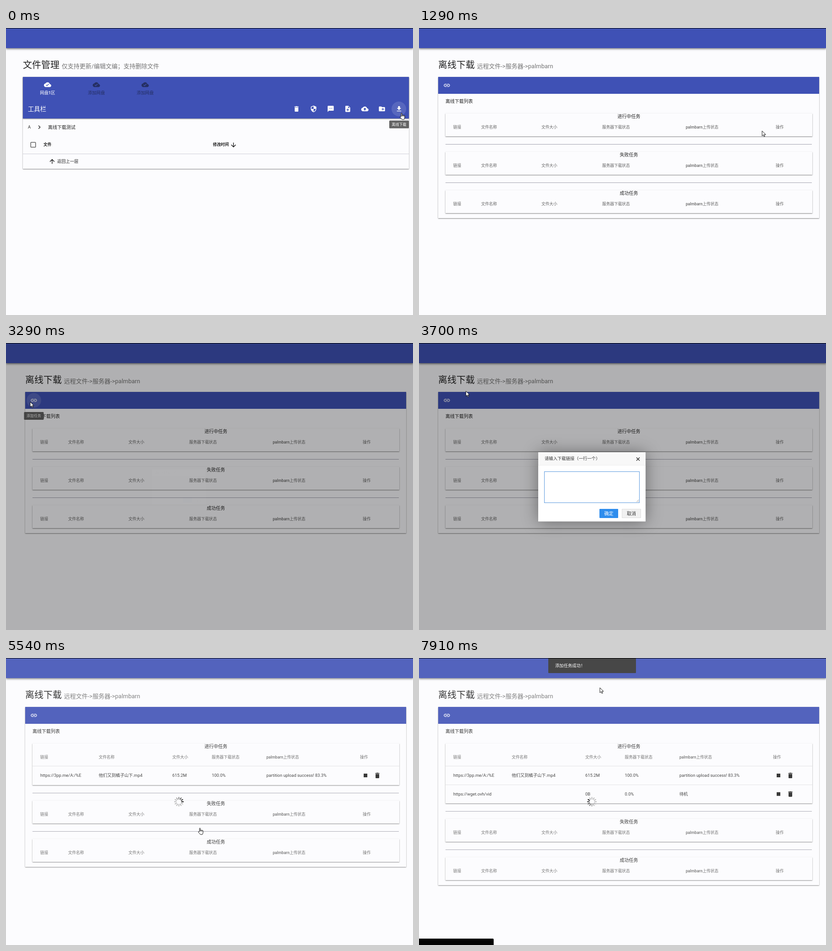
An HTML page with a canvas that plays this animation: 891x628 px, repeating every 8 s.

```html
<!DOCTYPE html>
<html lang="zh-CN">
<head>
<meta charset="utf-8">
<style>
html, body { margin: 0; width: 100%; height: 100%; overflow: hidden; background: #fcfcfe; }
canvas { display: block; }
</style>
</head>
<body>
<canvas id="stage" width="891" height="628"></canvas>
<script>
const W = 891, H = 628, LOOP = 8000;
const ctx = document.getElementById('stage').getContext('2d');
const BLUE = '#3f51b5', PAPER = '#fcfcfe', INK = '#222', GREY = '#757575';
const SANS = 'Roboto, "Noto Sans CJK SC", "Noto Sans CJK", sans-serif';
const MONO = '"Liberation Mono", monospace';
const SERVICE = 'palmbarn';

const CLOUD = 'M19.35 10.04C18.67 6.59 15.64 4 12 4 9.11 4 6.6 5.64 5.35 8.04 2.34 8.36 0 10.91 0 14c0 3.31 2.69 6 6 6h13c2.76 0 5-2.24 5-5 0-2.64-2.05-4.78-4.65-4.96z';
const paths = {
  trash: 'M6 19c0 1.1.9 2 2 2h8c1.1 0 2-.9 2-2V7H6v12zM19 4h-3.5l-1-1h-5l-1 1H5v2h14V4z',
  shield: 'M12 1L3 5v6c0 5.55 3.84 10.74 9 12 5.16-1.26 9-6.45 9-12V5l-9-4zm0 10.99h7c-.53 4.12-3.28 7.79-7 8.94V12H5V6.3l7-3.11v8.8z',
  message: 'M20 2H4c-1.1 0-1.99.9-1.99 2L2 22l4-4h14c1.1 0 2-.9 2-2V4c0-1.1-.9-2-2-2zM9 11H7V9h2v2zm4 0h-2V9h2v2zm4 0h-2V9h2v2z',
  addFile: 'M14 2H6c-1.1 0-1.99.9-1.99 2L4 20c0 1.1.89 2 1.99 2H18c1.1 0 2-.9 2-2V8l-6-6zm2 14h-3v3h-2v-3H8v-2h3v-3h2v3h3v2zm-3-7V3.5L18.5 9H13z',
  upload: CLOUD + 'M14 13v4h-4v-4H7l5-5 5 5h-3z',
  cloudDone: CLOUD + 'M10 17l-3.5-3.5 1.41-1.41L10 14.17 15.18 9l1.41 1.41L10 17z',
  addFolder: 'M20 6h-8l-2-2H4c-1.11 0-1.99.89-1.99 2L2 18c0 1.11.89 2 2 2h16c1.11 0 2-.89 2-2V8c0-1.11-.89-2-2-2zm-1 8h-3v3h-2v-3h-3v-2h3V9h2v3h3v2z',
  download: 'M19 9h-4V3H9v6H5l7 7 7-7zM5 18v2h14v-2H5z',
  link: 'M3.9 12c0-1.71 1.39-3.1 3.1-3.1h4V7H7c-2.76 0-5 2.24-5 5s2.24 5 5 5h4v-1.9H7c-1.71 0-3.1-1.39-3.1-3.1zM8 13h8v-2H8v2zm9-6h-4v1.9h4c1.71 0 3.1 1.39 3.1 3.1s-1.39 3.1-3.1 3.1h-4V17h4c2.76 0 5-2.24 5-5s-2.24-5-5-5z',
  stop: 'M6 6h12v12H6z',
  up: 'M4 12l1.41 1.41L11 7.83V20h2V7.83l5.58 5.59L20 12l-8-8-8 8z',
  down: 'M20 12l-1.41-1.41L13 16.17V4h-2v12.17l-5.58-5.59L4 12l8 8 8-8z',
  chevron: 'M10 6L8.59 7.41 13.17 12l-4.58 4.59L10 18l6-6z',
  arrow: 'M0 0V11l2.6-2.4 1.8 4 1.7-.8-1.8-3.8H8z',
  hand: 'M-1 8V.8q1-1.4 2 0V5q1-1 2 0 1-.8 2 .3 1-.6 1.8.5V10q0 2-1.5 4.2H1Q-1.2 11.5-3.4 9-3.4 7.3-1.8 7.6Z'
};
const shapes = Object.fromEntries(Object.entries(paths).map(([name, d]) => [name, new Path2D(d)]));

const clamp = x => Math.max(0, Math.min(1, x));
const progress = (t, start, length) => clamp((t - start) / length);
const easeOut = x => 1 - (1 - x) ** 3;

function rect(x, y, w, h, color) {
  ctx.fillStyle = color;
  ctx.fillRect(x, y, w, h);
}
function rounded(x, y, w, h, r, color) {
  ctx.fillStyle = color;
  ctx.beginPath();
  ctx.roundRect(x, y, w, h, r);
  ctx.fill();
}
function outline(x, y, w, h, color) {
  ctx.strokeStyle = color;
  ctx.lineWidth = 1;
  ctx.strokeRect(x + .5, y + .5, w - 1, h - 1);
}
function disc(x, y, r, color) {
  ctx.fillStyle = color;
  ctx.beginPath();
  ctx.arc(x, y, r, 0, 7);
  ctx.fill();
}
// y is the visual middle of the line
function text(s, x, y, size, color, weight = 400, align = 'left', family = SANS) {
  ctx.font = `${weight} ${size}px ${family}`;
  ctx.fillStyle = color;
  ctx.textAlign = align;
  ctx.fillText(s, x, y + size * .37);
}
function icon(name, x, y, color) {
  ctx.save();
  ctx.translate(x - 8, y - 8);
  ctx.scale(2 / 3, 2 / 3);
  ctx.fillStyle = color;
  ctx.fill(shapes[name], 'evenodd');
  ctx.restore();
}
function raised(x, y, w, h, color, blur = 2, alpha = .5, drop = 1) {
  ctx.save();
  ctx.shadowColor = `rgba(0,0,0,${alpha})`;
  ctx.shadowBlur = blur;
  ctx.shadowOffsetY = drop;
  rect(x, y, w, h, color);
  ctx.restore();
}
function scaled(cx, cy, scale, alpha, draw) {
  if (alpha <= 0) return;
  ctx.save();
  ctx.globalAlpha = alpha;
  ctx.translate(cx, cy);
  ctx.scale(scale, scale);
  ctx.translate(-cx, -cy);
  draw();
  ctx.restore();
}
function tooltip(label, x, y, shown) {
  scaled(x, y, shown, shown, () => {
    rounded(x - 21.5, y - 8.5, 43, 17, 1.5, 'rgba(90,90,90,.94)');
    text(label, x, y, 8, '#fff', 500, 'center');
  });
}

function pageTop(title, subtitle, x) {
  rect(0, 0, W, H, PAPER);
  raised(0, 0, W, 44, BLUE, 4, .5, 2);
  text(title, x, 81, 20, INK, 300);
  text(subtitle, x + 85, 83.5, 13, GREY);
}

function filesPage(t) {
  pageTop('文件管理', '仅支持更新/编辑文编；支持删除文件', 37);
  raised(37, 107, 845, 201, PAPER);
  raised(37, 107, 845, 91, BLUE);
  ['网盘1区', '添加网盘', '添加网盘'].forEach((label, i) => {
    const color = i ? '#252f63' : '#fff', x = 91 + i * 106.8;
    icon('cloudDone', x, 124, color);
    text(label, x, 142, 9.33, color, 500, 'center');
  });
  text('工具栏', 48, 177, 13.33, '#fff');
  disc(860, 177, 16, 'rgba(255,255,255,.13)');
  const ripple = progress(t, 80, 220);
  if (ripple) disc(860, 177, 16 * easeOut(ripple), 'rgba(255,255,255,.15)');
  ['trash', 'shield', 'message', 'addFile', 'upload', 'addFolder', 'download']
    .forEach((name, i) => icon(name, 636 + i * 37.4, 177, '#fff'));

  text('A', 48, 217, 9.33, INK);
  icon('chevron', 73, 217, INK);
  text('离线下载测试', 92, 217, 10, INK);
  rounded(53.5, 249.5, 12, 12, 1.5, '#606060');
  rect(55, 251, 9, 9, PAPER);
  text('文件', 82, 255, 8.67, INK, 700);
  text('修改时间', 453, 255, 8.67, INK, 700);
  icon('down', 498, 256, '#111');
  rect(37, 275, 845, 1, '#d0d0d8');
  icon('up', 101, 292, '#111');
  text('返回上一层', 112, 292, 9.33, INK);
  tooltip('离线下载', 860.5, 211, 1);
}

const headers = ['链接', '文件名称', '文件大小', '服务器下载状态', SERVICE + '上传状态', '操作'];
const emptyColumns = [75, 136, 268, 401, 584, 781];
const filledColumns = [75, 203, 364, 450.5, 570, 775];
const ROW = 122 / 3;
const tasks = [
  ['https://3pp.me/A:/%E', '他们又到橘子山下.mp4', '615.2M', '100.0%', 'partition upload success! 83.3%'],
  ['https://wget.ovh/vid', '', '0B', '0.0%', '待机']
];

function taskTable(title, top, rows) {
  const columns = rows.length ? filledColumns : emptyColumns;
  raised(58, top, 803, 50 + Math.round(ROW * rows.length), PAPER);
  text(title, 459.5, top + 6, 10, INK, 400, 'center');
  headers.forEach((label, i) => text(label, columns[i], top + 30, 8.67, '#666', 500));
  rows.forEach((row, r) => {
    const y = top + 70 + r * ROW;
    rect(58, top + 49 + Math.round(r * ROW), 803, 1, '#e0e0e2');
    row.forEach((cell, i) => text(cell, columns[i], y, 9.33, '#333'));
    icon('stop', 787, y, '#222');
    icon('trash', 813, y, '#222');
  });
}

function tasksPage(t) {
  const rows = tasks.slice(0, (t >= 5450) + (t >= 7600));
  const shift = Math.round(ROW * rows.length);
  pageTop('离线下载', `远程文件->服务器->${SERVICE}`, 42);
  raised(42, 107, 834, 309 + shift, PAPER);
  rect(42, 107, 834, 37, BLUE);
  const hover = progress(t, 2590, 220) * (1 - progress(t, 3420, 180));
  disc(61, 125.5, 16, `rgba(255,255,255,${.13 * hover})`);
  icon('link', 61, 125.5, '#fff');
  text('离线下载列表', 58, 160, 10, INK);
  taskTable('进行中任务', 187, rows);
  taskTable('失败任务', 271 + shift, []);
  taskTable('成功任务', 355 + shift, []);
  [254, 338].forEach(y => rect(58, y + shift, 802, 1, '#a2a2ae'));
  tooltip('添加任务', 61, 159.5, easeOut(hover));
}

function squiggle(from, to) {
  ctx.strokeStyle = '#e33';
  ctx.lineWidth = .7;
  ctx.beginPath();
  for (let x = from; x <= to; x++) ctx.lineTo(x, 292 + (x % 2 ? .6 : -.4));
  ctx.stroke();
}

function dialog(t) {
  raised(261, 239, 235, 151.5, '#fff', 33, .4, 1);
  rect(261, 239, 235, 28, '#f8f8f8');
  rect(261, 267, 235, 1, '#eee');
  text('请输入下载链接（一行一个）', 275, 253, 9.33, '#333');
  ctx.strokeStyle = '#222';
  ctx.lineWidth = 1.2;
  ctx.stroke(new Path2D('M476 250.5l7 7m0-7l-7 7'));
  outline(274, 281, 209, 69, '#5a98de');
  ctx.strokeStyle = '#888';
  ctx.lineWidth = .8;
  ctx.stroke(new Path2D('M476 348l5-5m-2 5l2-2'));
  if (t >= 4450) {
    text('https://wget.ovh/videos/test.mp4', 278, 288.5, 7.46, '#111', 400, 'left', MONO);
    squiggle(278, 300);
    squiggle(313, 350);
    squiggle(385, 421);
  }
  rounded(395, 363, 41, 20, 1.3, '#2e8ded');
  text('确定', 415.5, 373, 10, '#fff', 500, 'center');
  rounded(444, 363, 42, 20, 1.3, '#dedede');
  rounded(445, 364, 40, 18, 1, '#f1f1f1');
  text('取消', 465, 373, 10, '#333', 400, 'center');
}

function spinner(t) {
  const lead = Math.floor((t - 6200) / 76);
  ctx.save();
  ctx.translate(378.5, 314.5);
  ctx.lineWidth = 2;
  ctx.lineCap = 'round';
  for (let i = 0; i < 12; i++) {
    const age = (((lead - i) % 12) + 12) % 12;
    const shade = Math.min(185, 15 + age * 36);
    ctx.strokeStyle = `rgb(${shade},${shade},${shade})`;
    ctx.save();
    ctx.rotate(i * Math.PI / 6);
    ctx.beginPath();
    ctx.moveTo(0, -6);
    ctx.lineTo(0, -9.6);
    ctx.stroke();
    ctx.restore();
  }
  ctx.restore();
}

function toast(t) {
  const y = 33 - 48 * (1 - easeOut(progress(t, 5960, 400)));
  if (y <= 0) return;
  rounded(283, y - 48, 192, 48, 1.5, '#323232');
  text('添加任务成功！', 298, y - 16, 9.33, '#fff', 500);
}

// [time, x, y]
const route = [
  [0, 866, 186], [450, 865, 187], [950, 865, 187], [1750, 573, 285], [2370, 78.5, 147], [2580, 53, 129],
  [3400, 53, 129], [4000, 152, 82], [4400, 380, 285], [4790, 489, 332], [4950, 425, 360],
  [5150, 424.5, 372], [6450, 424.5, 372], [6900, 97, 230], [7330, 260, 88], [7910, 396, 65], [LOOP, 396, 65]
];
const inside = (t, a, b) => t >= a && t < b;

function pointer(t) {
  const i = route.findIndex(stop => stop[0] > t);
  const [t0, x0, y0] = route[i - 1], [t1, x1, y1] = route[i];
  const p = (t - t0) / (t1 - t0), k = p * p * (3 - 2 * p);
  const hand = inside(t, 0, 300) || inside(t, 2330, 3200) || inside(t, 5040, 6500);
  const shape = shapes[hand ? 'hand' : 'arrow'];
  ctx.save();
  ctx.translate(x0 + (x1 - x0) * k, y0 + (y1 - y0) * k);
  ctx.fillStyle = '#fff';
  ctx.strokeStyle = '#000';
  ctx.lineWidth = .9;
  ctx.fill(shape);
  ctx.stroke(shape);
  if (hand) ctx.stroke(new Path2D('M1 4.5v3m2-2.5v2.5m2-2v2'));
  ctx.restore();
}

function draw(t) {
  if (t < 300) filesPage(t);
  else if (t < 950) rect(0, 0, W, H, '#0a0a0a');
  else tasksPage(t);

  if (inside(t, 3200, 5400)) {
    const closing = progress(t, 5200, 200);
    rect(0, 0, W, H, `rgba(0,0,0,${.3 * (1 - closing)})`);
    const opening = easeOut(progress(t, 3290, 300));
    scaled(378.5, 314.5, (.5 + opening / 2) * (1 - closing * .4), opening * (1 - closing), () => dialog(t));
  }
  if (t >= 5400) {
    toast(t);
    rect(0, 0, W, H, 'rgba(255,255,255,.1)');
    spinner(t);
  }
  if (t >= 7600) rounded(0, 614, 163.5, 16, [0, 2, 0, 0], '#050505');
  rect(0, 0, W, 1, '#000');
  pointer(t);
}

const began = performance.now();
function frame() {
  draw((performance.now() - began) % LOOP);
  requestAnimationFrame(frame);
}
frame();
</script>
</body>
</html>
```
